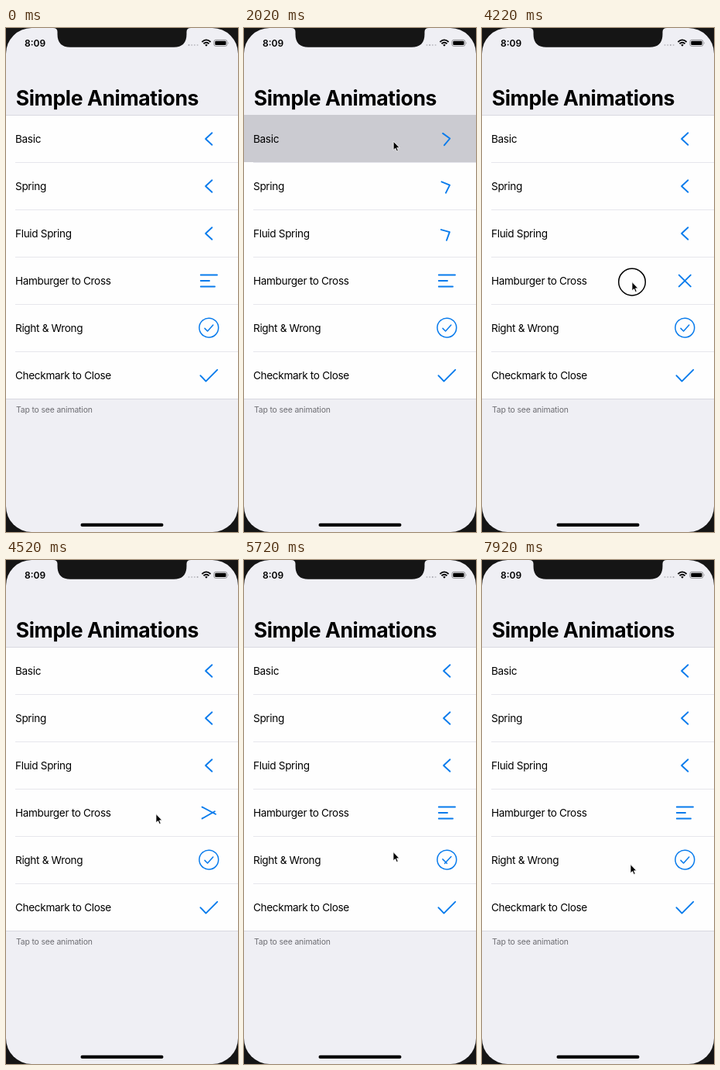
An HTML page that plays this animation: 300x650 px, repeating every 8 s.

```html
<!DOCTYPE html>
<html lang="en">
<head>
<meta charset="utf-8">
<title>Simple Animations</title>
<style>
html, body { margin: 0; width: 100%; height: 100%; overflow: hidden; background: #151515; }
svg { display: block; width: 300px; height: 650px; }
text { font-family: Inter, "Liberation Sans", sans-serif; fill: #000; }
.title { font-size: 26.6px; font-weight: 700; letter-spacing: -.4px; }
.label { font-size: 13.6px; letter-spacing: -.34px; }
.note { font-size: 10.4px; letter-spacing: -.15px; fill: #6d6d72; }
.clock { font-size: 12px; font-weight: 600; }
.icon { fill: none; stroke: #087bec; stroke-width: 1.9; stroke-linecap: round; stroke-linejoin: round; }
.rule { stroke: #e6e6ec; stroke-width: 1; }
.edge { stroke: #d8d8e0; stroke-width: 1; }
#dots circle { fill: #a8a8ae; }
</style>
</head>
<body>
<svg viewBox="0 0 300 650">
  <rect width="300" height="650" rx="33" fill="#efeff4"/>
  <path fill="#151515" d="M61 0Q66.5 0 66.5 5V8Q66.5 24.7 83 24.7H217Q233.5 24.7 233.5 8V5Q233.5 0 239 0Z"/>
  <text class="clock" x="24" y="23.5">8:09</text>
  <g id="dots">
    <circle cx="236.5" cy="22" r="1"/><circle cx="240.2" cy="22" r="1"/>
    <circle cx="243.9" cy="22" r="1"/><circle cx="247.6" cy="22" r="1"/>
  </g>
  <g fill="none" stroke="#000" stroke-width="1.8">
    <path d="M253.4 18Q259 12.8 264.6 18"/>
    <path d="M255.5 20.2Q259 17.2 262.5 20.2"/>
  </g>
  <path d="M257.2 21.8Q259 20.4 260.8 21.8L259 23.7Z"/>
  <rect x="268.9" y="15.4" width="17" height="8" rx="2.3" fill="none" stroke="#86868a" stroke-width=".9"/>
  <rect x="270.3" y="16.8" width="14.2" height="5.2" rx="1.1"/>
  <path d="M287 18Q288.3 19.4 287 20.8Z" fill="#86868a"/>

  <text class="title" x="12.8" y="100">Simple Animations</text>
  <rect y="112" width="300" height="366" fill="#fefefe"/>
  <g id="rows"></g>
  <path class="edge" d="M0 112.5H300M0 478.5H300"/>
  <rect id="glow" width="300" height="61" fill="#cbcbd1"/>
  <g id="labels"></g>
  <text class="note" x="13" y="496">Tap to see animation</text>

  <g class="icon">
    <path class="chevron" d="M4.2 -7.7L-4.1 0L4.2 7.7"/>
    <path class="chevron" d="M4.2 -7.7L-4.1 0L4.2 7.7"/>
    <path class="chevron" d="M4.2 -7.7L-4.1 0L4.2 7.7"/>
    <path id="menu"/>
    <path id="mid" d="M251.8 326H263"/>
    <circle cx="262.3" cy="386.6" r="12.4" stroke-width="1.5"/>
    <path id="mark" stroke-width="1.5"/>
    <path d="M251.5 448.3L258.5 455.6L273.2 440.8"/>
  </g>
  <rect x="96.5" y="638.8" width="107" height="4.2" rx="2.1"/>

  <circle id="ring" r="17.3" fill="none" stroke="#000" stroke-width="1.5"/>
  <path id="cursor" d="M0 0V11.2L2.6 8.9L4.4 12.9L6.2 12.1L4.5 8.2H7.9Z"
    stroke="#fff" stroke-width=".8" stroke-linejoin="round"/>
</svg>
<script>
const LOOP = 8000, TOP = 112, ROW = 61;
const names = ["Basic", "Spring", "Fluid Spring", "Hamburger to Cross", "Right & Wrong", "Checkmark to Close"];
// touch down, release (ms) and the row touched
const taps = [
  { down: 800, up: 920, row: 0 }, { down: 1800, up: 1960, row: 0 },
  { down: 2920, up: 3090, row: 3 }, { down: 4180, up: 4310, row: 3 },
  { down: 5400, up: 5530, row: 4 }, { down: 6600, up: 6720, row: 4 }
];
// pointer moves: start, end, target
const moves = [
  [120, 720, 193.2, 146.2], [2350, 2850, 194, 327.6],
  [4700, 5250, 193, 376.6], [5750, 6400, 192, 392.6]
];
const entry = [300, 240];

const $ = id => document.getElementById(id);
const chevrons = document.querySelectorAll(".chevron");
const dots = document.querySelectorAll("#dots circle");
const show = (el, on) => el.setAttribute("visibility", on ? "visible" : "hidden");
const place = (el, x, y) => el.setAttribute("transform", `translate(${x} ${y})`);
const mix = (a, b, k) => a + (b - a) * k;
const clamp = k => Math.max(0, Math.min(1, k));
const ease = k => { k = clamp(k); return k * k * (3 - 2 * k); };

const spring = (w, z) => s => {
  const d = w * Math.sqrt(1 - z * z);
  return 1 - Math.exp(-z * w * s) * (Math.cos(d * s) + z * w / d * Math.sin(d * s));
};
const turns = [s => ease(s / .5), spring(8.8, .5), spring(10.5, .6)];

function add(parent, tag, attrs, text = "") {
  const el = document.createElementNS("http://www.w3.org/2000/svg", tag);
  for (const k in attrs) el.setAttribute(k, attrs[k]);
  el.textContent = text;
  $(parent).append(el);
}
names.forEach((name, i) => {
  const y = TOP + ROW * i;
  if (i) add("rows", "path", { class: "rule", d: `M12 ${y + .5}H300` });
  add("labels", "text", { class: "label", x: 12, y: y + 36 }, name);
});

// 0 = resting shape, 1 = toggled shape; every tap on the row flips it
function toggle(row, t, curve) {
  const done = taps.filter(p => p.row === row && t >= p.up);
  if (!done.length) return 0;
  const k = curve((t - done[done.length - 1].up) / 1000);
  return done.length % 2 ? k : 1 - k;
}

// line segments [x1, y1, x2, y2] blended between two shapes
function morph(el, from, to, k) {
  el.setAttribute("d", from.map((seg, i) => {
    const [a, b, c, d] = seg.map((v, j) => mix(v, to[i][j], k));
    return `M${a} ${b}L${c} ${d}`;
  }).join(""));
}

function draw(t) {
  let [x, y] = entry;
  for (const [a, b, tx, ty] of moves) {
    const k = ease((t - a) / (b - a));
    x = mix(x, tx, k);
    y = mix(y, ty, k);
  }
  place($("cursor"), x, y);
  show($("cursor"), t >= 120);
  place($("ring"), x, y);
  show($("ring"), taps.some(p => t >= p.down && t < p.up));

  const lit = taps.find(p => t >= p.up && t < p.up + 100);
  show($("glow"), lit);
  if (lit) $("glow").setAttribute("y", TOP + ROW * lit.row);

  chevrons.forEach((el, i) => {
    const angle = 180 * toggle(0, t, turns[i]);
    el.setAttribute("transform", `translate(262.2 ${143 + ROW * i}) rotate(${angle})`);
  });

  const cross = toggle(3, t, s => ease(s / .5));
  morph($("menu"),
    [[251.8, 318.5, 273, 318.5], [251.8, 333.5, 270, 333.5]],
    [[254.8, 318.6, 269.8, 333.4], [254.8, 333.4, 269.8, 318.6]], cross);
  $("mid").setAttribute("opacity", clamp(1 - cross * 1.6));

  morph($("mark"),
    [[257, 387.4, 260.6, 391], [260.6, 391, 267.8, 383]],
    [[256.6, 381, 268, 392.4], [256.6, 392.4, 268, 381]],
    toggle(4, t, s => ease(s / .6)));

  dots.forEach((el, i) => el.setAttribute("opacity", Math.floor(t / 400) % 4 === i ? 1 : .65));
}

const begin = performance.now();
function tick() {
  const t = (performance.now() - begin) % LOOP;
  // the motion is shown at ten pictures a second
  draw(t < 120 ? 0 : Math.floor((t - 20) / 100) * 100 + 20);
  requestAnimationFrame(tick);
}
tick();
</script>
</body>
</html>
```
